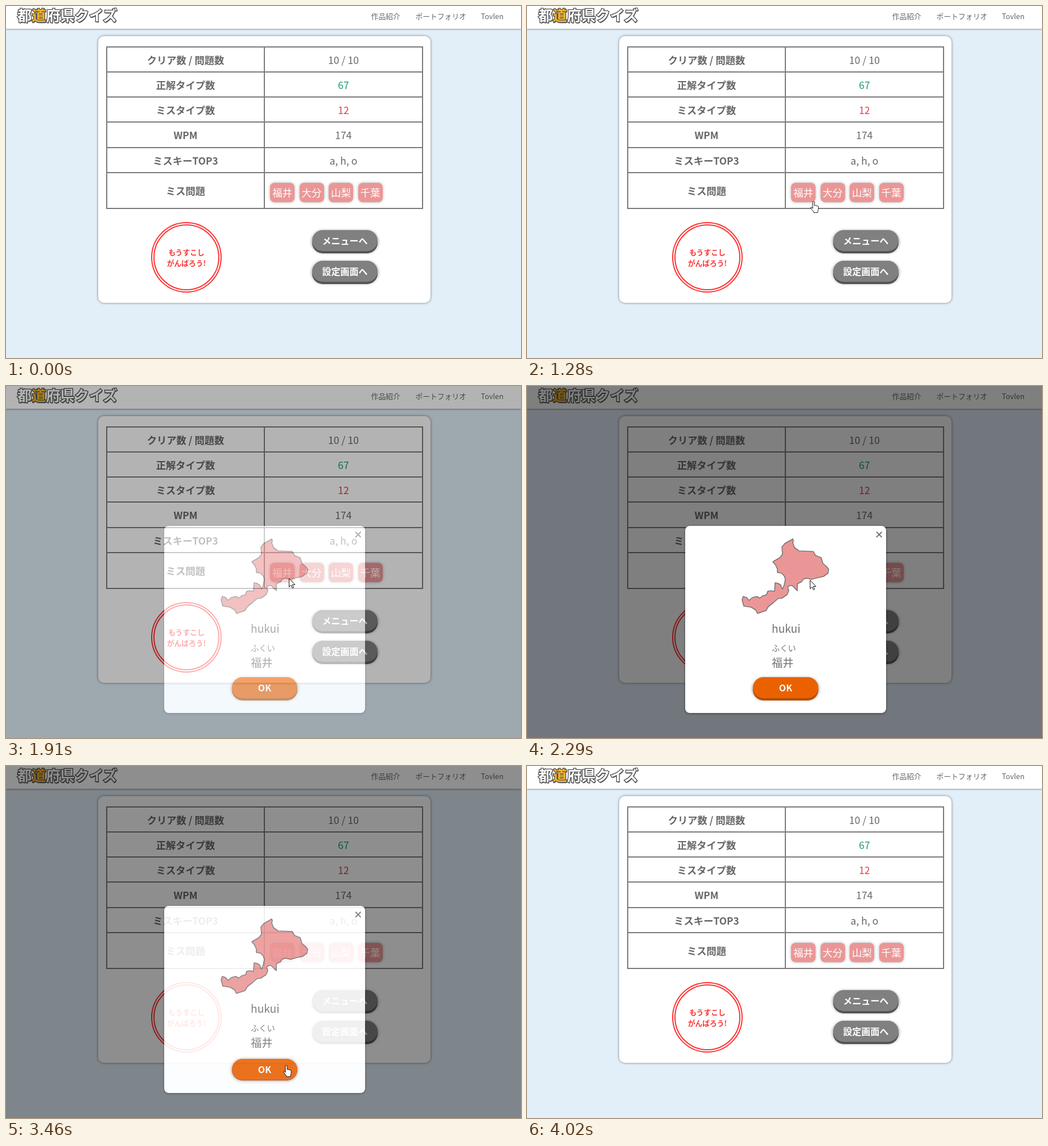
An HTML page that plays this animation: 905 by 619 pixels, repeating every 4220 ms.

```html
<!DOCTYPE html>
<html lang="ja">
<head>
<meta charset="utf-8">
<title>都道府県クイズ</title>
<style>
* { box-sizing: border-box; }
html, body { margin: 0; width: 100%; height: 100%; overflow: hidden; }
body {
  position: relative;
  background: #e2eff9;
  color: #686868;
  font: 17.6px "Noto Sans CJK JP", "Noto Sans CJK", "Noto Sans JP", sans-serif;
  white-space: nowrap;
}
.abs, header, header > *, main, .grid, .stamp, .btn, .layer, .modal, .modal > *, .cursor { position: absolute; }

header {
  left: 0; top: 0; width: 100%; height: 40px;
  background: #fff;
  box-shadow: 0 1px 3px rgba(0, 0, 0, .4);
  font-size: 12.8px; line-height: 35px;
}
h1 {
  left: 20px; top: 0; margin: 0;
  font-size: 25.2px; line-height: 30px; font-weight: 700;
  color: #fff;
  -webkit-text-stroke: 2.6px #4f4f4f;
  paint-order: stroke fill;
  text-shadow: 1px 2px 0 #555;
}
h1 b { color: #f5b52a; }

main {
  left: 162px; top: 53px; width: 584px; height: 469px;
  background: #fff;
  border-radius: 10px;
  box-shadow: 0 0 4px rgba(0, 0, 0, .5);
}
.grid {
  left: 176px; top: 71px; width: 557px; height: 286px;
  display: grid; gap: 2px; padding: 2px;
  grid-template: 42px 42px 42px 43px 42px 61px / 275px 276px;
  background: #7a7a7a;
}
.grid > * { display: flex; align-items: center; justify-content: center; background: #fff; }
.grid > b { font-size: 17.3px; }
.grid .chips { justify-content: flex-start; gap: 8.5px; padding: 7px 0 0 9px; }
.chips i {
  width: 43px; height: 34px;
  border-radius: 8px;
  background: #eb9696; color: #fff;
  box-shadow: 0 0 5px rgba(0, 0, 0, .3);
  font-style: normal; line-height: 34px; text-align: center;
}

.stamp {
  left: 255px; top: 380px; width: 124px; height: 124px;
  padding-top: 38px;
  border: 6px double #f33; border-radius: 50%;
  color: #f33;
  font-size: 12.8px; line-height: 18.6px; font-weight: 700; text-align: center;
}
.btn {
  width: 115px; height: 37px;
  border-radius: 20px;
  background: var(--face); color: #fff;
  box-shadow: 0 4px 0 var(--edge), 0 2px 5px 1px rgba(0, 0, 0, .4);
  font-size: 16px; line-height: 37px; font-weight: 700; text-align: center;
}
.gray { left: 538px; --face: #808080; --edge: #555; }

.layer {
  inset: 0;
  background: rgba(0, 0, 0, .5);
  opacity: 0;
  animation: fade 4220ms infinite;
}
.modal {
  left: 278px; top: 246px; width: 353px; height: 329px;
  background: #fff;
  border-radius: 8px;
  box-shadow: 0 1px 4px rgba(0, 0, 0, .45);
}
.modal svg { left: 0; top: 0; }
.modal p { left: 152px; margin: 0; font-size: 19.2px; line-height: 28px; color: #727272; }
.modal .kana { font-size: 14.2px; }
.ok {
  left: 119px; top: 266px;
  --face: #eb6100; --edge: #b84c00;
  animation: hover 4220ms step-end infinite;
}

.cursor {
  left: 0; top: 0; width: 1px; height: 1px; overflow: visible;
  fill: #fff; stroke: #111; stroke-linejoin: round;
  animation: move 4220ms linear infinite;
}
.arrow { animation: arrow 4220ms step-end infinite; }
.hand { animation: hand 4220ms step-end infinite; }

@keyframes fade {
  0%, 42.84% { opacity: 0; animation-timing-function: ease; }
  49.95%, 81.21% { opacity: 1; animation-timing-function: ease; }
  88.32%, 100% { opacity: 0; }
}
@keyframes hover {
  0%, 87%, 100% { transform: none; }
  64.7% {
    transform: translateY(3px);
    box-shadow: 0 1px 0 var(--edge), 0 1px 5px 1px rgba(0, 0, 0, .35);
  }
}
@keyframes move {
  0%, 12.3% { transform: translate(862px, 630px); }
  12.56% { transform: translate(858px, 612px); animation-timing-function: cubic-bezier(.3, .1, .4, 1); }
  24.88%, 25.83% { transform: translate(579px, 362px); animation-timing-function: cubic-bezier(.3, .2, .6, 1); }
  30.33% { transform: translate(504px, 343px); animation-timing-function: ease-out; }
  34.12%, 54.03% { transform: translate(497px, 338px); }
  54.27% { transform: translate(497px, 341px); animation-timing-function: ease-in-out; }
  66.35% { transform: translate(493px, 523px); }
  67.77%, 86.26% { transform: translate(493px, 526px); animation-timing-function: ease-in-out; }
  91%, 91.71% { transform: translate(812px, 589px); }
  94.8% { transform: translate(853px, 612px); }
  95.2%, 100% { transform: translate(862px, 630px); }
}
@keyframes arrow {
  0%, 43.36%, 87%, 100% { visibility: visible; }
  30%, 64.7% { visibility: hidden; }
}
@keyframes hand {
  0%, 43.36%, 87%, 100% { visibility: hidden; }
  30%, 64.7% { visibility: visible; }
}
</style>
</head>
<body>
<header>
  <h1>都<b>道</b>府県クイズ</h1>
  <span style="left:641.6px">作品紹介</span>
  <span style="left:719.4px">ポートフォリオ</span>
  <span style="left:834.6px">Tovlen</span>
</header>

<main></main>
<div class="grid">
  <b>クリア数 / 問題数</b><span>10 / 10</span>
  <b>正解タイプ数</b><span style="color:#1f9d72">67</span>
  <b>ミスタイプ数</b><span style="color:#e0404a">12</span>
  <b>WPM</b><span>174</span>
  <b>ミスキーTOP3</b><span>a, h, o</span>
  <b>ミス問題</b>
  <span class="chips"><i>福井</i><i>大分</i><i>山梨</i><i>千葉</i></span>
</div>
<div class="stamp">もうすこし<br>がんばろう!</div>
<div class="btn gray" style="top:394px">メニューへ</div>
<div class="btn gray" style="top:448px">設定画面へ</div>

<div class="layer">
  <div class="modal">
    <svg width="353" height="329" viewBox="278 246 353 329" fill="none" stroke="#777">
      <path d="M614 256.500l9.500 9.500m0-9.500l-9.500 9.500" stroke-width="2"/>
      <path fill="#eb9696" stroke-width="1.6" stroke-linejoin="round" d="M467 269L468 272 467 276 470 284 478 290 503 291 507 298 517 302 520 312 526 317 530 322 529 329 521 335 511 337 500 340 491 338 485 340 483 344 475 348 475 360 466 351 462 351 458 353 460 360 457 367 448 373 441 374 433 381 424 388 420 395 405 400 402 394 394 389 381 387 378 376 380 370 386 372 390 377 396 372 404 370 409 373 414 369 421 367 423 361 428 360 435 361 436 346 441 347 446 350 447 354 449 357 452 350 454 340 452 334 447 329 440 328 440 322 437 315 432 309 444 302 449 296 448 283 453 277 460 273Z"/>
    </svg>
    <p style="top:166px">hukui</p>
    <p style="top:200px" class="kana">ふくい</p>
    <p style="top:226px">福井</p>
    <div class="btn ok">OK</div>
  </div>
</div>

<svg class="cursor">
  <path class="arrow" d="M.5.500V15.500l3.500-3.200 2.300 5.200 2.200-1-2.300-5H10.800Z"/>
  <path class="hand" transform="translate(-6 0)" d="M4 13V2.200a1.600 1.600 0 0 1 3.200 0V8.200c.3-1 2.400-1 2.700.3.400-.8 2.100-.7 2.300.6.600-.7 1.900-.3 1.900 1V14c0 2.200-1.300 3-1.300 6.300H6c0-2.300-3-4.300-5.200-8-.5-1.300 1-2.100 2-1.100Z"/>
</svg>
</body>
</html>
```
